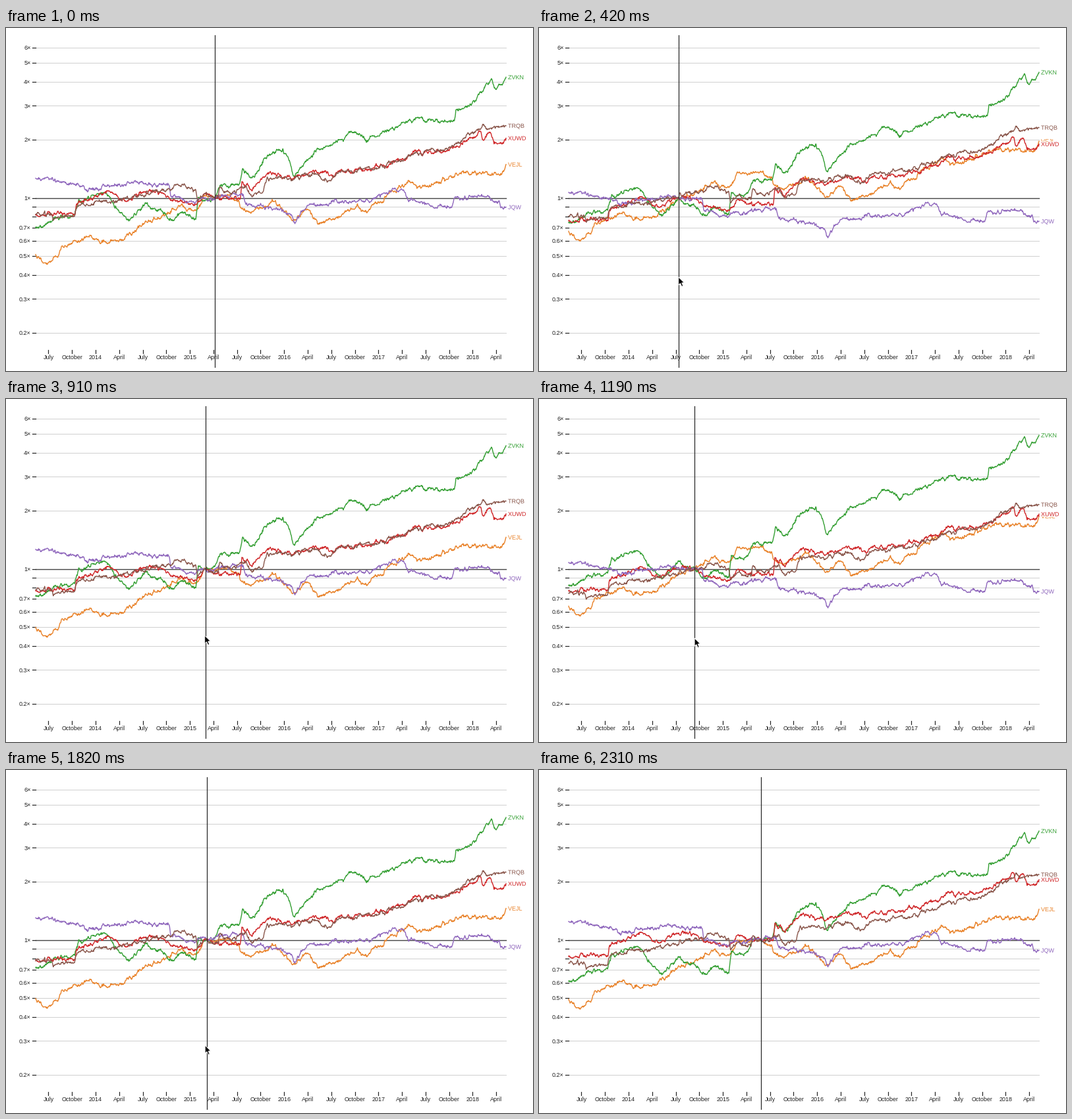
These frames come from a looping animation (800x522 px, 2.52 s). A matplotlib script:

```python
import numpy as np
import matplotlib.pyplot as plt
from matplotlib.animation import FuncAnimation
from matplotlib.patches import Polygon
from matplotlib.patheffects import withStroke

W, H, DPI = 800, 522, 100
FRAMES, INTERVAL = 36, 70
LEFT, RIGHT, BASE = 45, 759, 258.6
LOG_SCALE = 127.7          # pixels per natural-log unit
PX = 72 / DPI              # one pixel in points
INK = "#222222"

plt.rcParams["font.family"] = "Liberation Sans"
fig = plt.figure(figsize=(W / DPI, H / DPI), dpi=DPI, facecolor="white")
ax = fig.add_axes([0, 0, 1, 1])
ax.set(xlim=(0, W), ylim=(H, 0))
ax.axis("off")

# Name, colour and the main trend breaks of each price; a walk fills the days between.
SERIES = [
    ("VEJL", "#e9832b",
     [(45, 345), (63, 360), (85, 332), (125, 318), (147, 326), (180, 322),
      (212, 294), (237, 286), (265, 270), (288, 278), (303, 256), (317, 259),
      (338, 255), (371, 281), (410, 267), (435, 294), (457, 276), (474, 299),
      (500, 290), (533, 269), (547, 280), (580, 252), (612, 234), (637, 241),
      (684, 222), (753, 222), (759, 208)]),
    ("ZVKN", "#36a035",
     [(45, 304), (75, 288), (104, 285), (110, 263), (147, 251), (186, 292),
      (212, 267), (237, 279), (252, 292), (270, 281), (288, 292), (292, 258),
      (317, 259), (323, 243), (355, 236), (359, 214), (374, 228), (391, 200),
      (420, 184), (437, 226), (472, 184), (530, 159), (547, 174), (613, 139),
      (681, 140), (683, 124), (708, 114), (737, 77), (744, 94), (759, 75)]),
    ("XUWD", "#d02a2c",
     [(45, 285), (105, 284), (107, 268), (155, 248), (180, 263), (212, 249),
      (237, 251), (250, 263), (285, 270), (303, 252), (317, 259), (338, 261),
      (356, 259), (358, 234), (373, 248), (397, 221), (435, 230), (463, 219),
      (497, 228), (505, 218), (547, 215), (606, 202), (620, 187), (660, 190),
      (721, 158), (723, 170), (736, 160), (741, 176), (753, 177), (759, 168)]),
    ("JQW", "#9068bd",
     [(45, 229), (106, 240), (122, 248), (172, 238), (204, 235), (237, 238),
      (248, 240), (250, 256), (283, 265), (303, 259), (317, 259), (345, 252),
      (372, 270), (420, 278), (438, 297), (458, 270), (500, 261), (547, 261),
      (588, 245), (605, 250), (610, 262), (655, 274), (678, 270), (680, 260),
      (716, 256), (749, 264), (751, 274), (759, 273)]),
    ("TRQB", "#8a574c",
     [(45, 284), (68, 282), (72, 293), (104, 287), (110, 271), (165, 266),
      (212, 256), (237, 245), (260, 238), (288, 246), (291, 264), (303, 252),
      (317, 259), (322, 258), (324, 243), (350, 248), (364, 240), (373, 257),
      (390, 250), (396, 229), (435, 232), (463, 224), (493, 233), (505, 220),
      (547, 213), (600, 203), (620, 191), (665, 187), (721, 153), (759, 149)]),
]

# (frame, position) keys for the index rule and the pointer's height
RULE_KEYS = [(0, 317), (6, 211.6), (10, 332), (13, 302.6), (17, 236),
             (22, 547), (26, 305), (29, 215), (32, 337)]
HEIGHT_KEYS = [(0, 430), (6, 379), (13, 360), (17, 364), (22, 397),
               (26, 419), (31, 510)]


def glide(keys, t):
    """Eased path through the keys, resting only at turning points."""
    times, values = np.array(keys, float).T
    slopes = np.diff(values) / np.diff(times)
    before, after = slopes[:-1], slopes[1:]
    turning = before * after <= 0
    tangents = np.zeros(len(times))
    tangents[1:-1] = np.where(turning, 0, 2 * before * after / (before + after))
    t = np.clip(t, times[0], times[-1])
    i = min(np.searchsorted(times, t, side="right") - 1, len(slopes) - 1)
    span = times[i + 1] - times[i]
    u = (t - times[i]) / span
    ease = u * u * (3 - 2 * u)
    return (values[i] + (values[i + 1] - values[i]) * ease
            + span * u * (1 - u) * ((1 - u) * tangents[i] - u * tangents[i + 1]))


def daily_prices(points):
    """Follow the trend with mean-reverting noise that vanishes at its breaks."""
    px, py = np.array(points, float).T
    shocks = rng.normal(0, 1.1, len(days))
    noise = np.convolve(shocks, 0.86 ** np.arange(40))[:len(days)]
    drift = np.interp(days, px, np.interp(px, days, noise))
    return np.interp(days, px, py) + noise - drift


def label(x, y, text, **style):
    return ax.text(x, y, text, fontsize=9 * PX, **style)


def stroke(xs, ys, color=INK, width=1.2, **style):
    return ax.plot(xs, ys, color=color, lw=width * PX, **style)[0]


def draw_axes():
    for tenths in [*range(2, 10), *range(10, 61, 10)]:
        y = BASE - LOG_SCALE * np.log(tenths / 10)
        if tenths == 10:
            stroke([LEFT, RIGHT], [y, y], "#444444", 1.4, zorder=1)
        else:
            stroke([LEFT, RIGHT], [y, y], "#d0d0d0", 1, zorder=1)
        stroke([40, LEFT], [y, y], zorder=1)
        if tenths not in (8, 9):
            label(37.5, y + 3.2, f"{tenths / 10:g}×", ha="right", color=INK)
    for quarter in range(2, 22):
        year, season = divmod(quarter, 4)
        x = 136 + 143.1 * (quarter / 4 - 1)
        name = ("", "April", "July", "October")[season] or str(2013 + year)
        stroke([x, x], [490, 495])
        label(x, 504, name, ha="center", color=INK)


rng = np.random.default_rng(12)
days = np.linspace(LEFT, RIGHT, 1258)
draw_axes()

curves = []
for order, (name, color, points) in enumerate(SERIES):
    prices = daily_prices(points)
    line = stroke(days, prices, color, 1.4, zorder=3 + order,
                  solid_joinstyle="round")
    tag = label(762, 0, name, color=color, zorder=3.5 + order,
                path_effects=[withStroke(linewidth=2.5 * PX, foreground="white")])
    curves.append((prices, line, tag))

rule = stroke([0, 0], [10.5, 515.5], zorder=10)
ARROW = np.array([(0, 0), (0, 12.2), (2.8, 9.6), (5, 14.4), (7.1, 13.4),
                  (5, 8.9), (8.8, 8.7)])
pointer = Polygon(ARROW, closed=True, facecolor="black", edgecolor="white",
                  lw=0.9 * PX, zorder=11)
ax.add_patch(pointer)


def update(frame):
    x = glide(RULE_KEYS, frame)
    rule.set_xdata([x, x])
    for prices, line, tag in curves:
        shifted = prices + BASE - np.interp(x, days, prices)
        line.set_ydata(shifted)
        tag.set_y(shifted[-1] + 3.2)
    # The pointer runs slightly ahead of the rule.
    tip = glide(RULE_KEYS, frame + 0.07), glide(HEIGHT_KEYS, frame)
    pointer.set_xy(ARROW + tip)
    pointer.set_visible(0 < frame < 32)
    return [rule, pointer, *(artist for curve in curves for artist in curve[1:])]


animation = FuncAnimation(fig, update, frames=FRAMES, interval=INTERVAL,
                          repeat=True, repeat_delay=0)
plt.show()
```
